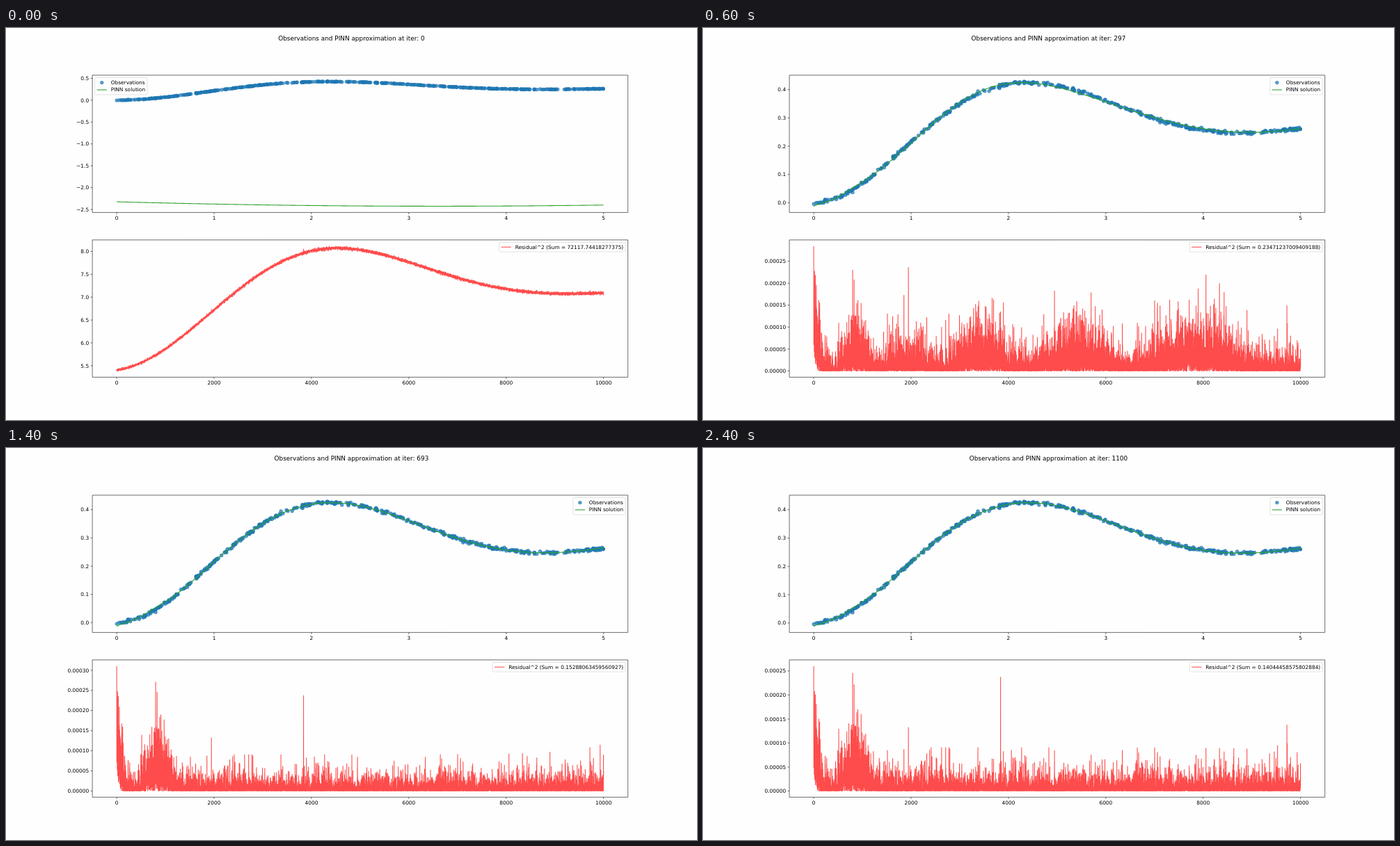
An HTML page with a canvas for the animation above (2600 ms loop, 993 by 564 pixels).

```html
<!DOCTYPE html>
<html lang="en">
<head>
<meta charset="utf-8">
<title>PINN training</title>
<style>
html, body { margin: 0; width: 100%; height: 100%; overflow: hidden; background: #fefefe; }
canvas { display: block; }
</style>
</head>
<body>
<canvas id="plot" width="993" height="564"></canvas>
<script>
const ctx = document.getElementById('plot').getContext('2d');
const PT = 0.718, EM = 10 * PT, FONT = '"DejaVu Sans", sans-serif';
const LEFT = 124.1, RIGHT = 893.7, X0 = 159.1, XSPAN = 699.6, HEIGHT = 197.5;
const TOP = 67.9, BOTTOM = 304.9;
const RED = 'rgba(255,0,0,.7)', GREEN = '#2ca02c', BLUE = 'rgba(31,119,180,.7)';
const N = 10000;
const { PI, exp, sin, cos, sqrt, min, max, floor, abs } = Math;

// Seeded noise, damped near the first sample, with a few strong outliers
let seed = 20231;
const rand = () => {
  seed = (seed + 0x6D2B79F5) | 0;
  let t = Math.imul(seed ^ seed >>> 15, 1 | seed);
  t = t + Math.imul(t ^ t >>> 7, 61 | t) ^ t;
  return ((t ^ t >>> 14) >>> 0) / 4294967296;
};
const gauss = () => sqrt(-2 * Math.log(1 - rand())) * cos(2 * PI * rand());
const noise = Array.from({ length: N + 1 }, (_, i) => {
  const limit = min(0.0095, 0.0044 + i * 2.5e-5);
  return max(-limit, min(limit, 0.003 * gauss()));
});
Object.assign(noise, { 0: 0.0047, 800: -0.0095, 1945: 0.0115, 3838: 0.0154, 9720: 0.0113, 9930: -0.0095 });

const observed = Array.from({ length: 500 }, () => floor(rand() * N));

// Step response of a damped oscillator
const truth = x => {
  const a = 0.3954, w = 1.428;
  return 0.2995 * (1 - exp(-a * x) * (cos(w * x) + a / w * sin(w * x)));
};

// Smooth curve through [x, y] knots
function curve(knots) {
  const last = knots.length - 1;
  const slope = i => {
    const a = knots[max(0, i - 1)], b = knots[min(last, i + 1)];
    return (b[1] - a[1]) / (b[0] - a[0]);
  };
  return x => {
    let i = 0;
    while (i < last - 1 && x > knots[i + 1][0]) i++;
    const [xa, ya] = knots[i], [xb, yb] = knots[i + 1];
    const h = xb - xa, t = (x - xa) / h, s = 1 - t;
    return s * s * (1 + 2 * t) * ya + t * t * (3 - 2 * t) * yb
      + h * t * s * (s * slope(i) - t * slope(i + 1));
  };
}

// Model error late in training: dip at 0, bump at 0.4, drift at the end, slowing wave
const late = (dip, bump, end, wave = 0) => x => {
  const phase = (max(sqrt(x), 0.465) - 0.8) / 0.335;
  return dip * exp(-x / 0.07) + bump * exp(-(((x - 0.4) / 0.19) ** 2))
    + end * exp((x - 5) / 0.4) - wave * min(1, 0.35 + 0.4 * x) * sin(PI * phase);
};

const stages = [
  { sum: '72117.74418277375', error: x => -2.427 + 0.102 * (1 - x / 3.3) ** 2 - truth(x) },
  { sum: '44.877644646853334', error: curve([[0, 0.09], [0.16, 0.0955], [0.5, 0.067], [0.92, 0], [1.4, -0.072],
    [1.97, -0.108], [2.55, -0.075], [3.165, 0], [3.55, 0.043], [4.125, 0.067], [5, 0.0205]]) },
  { sum: '3.2461802957314862', error: late(-0.018, 0.005, -0.02, 0.018) },
  { sum: '0.23471237009409188', error: late(-0.0122, 0.003, 0.003, 0.0053) },
  { sum: '0.15490528224337025', error: late(-0.0136, 0.007, 0.0034) },
  { sum: '0.15288063459560927', error: late(-0.013, 0.007, 0.0013) },
  { sum: '0.1529496862778658', error: late(-0.0129, 0.007, -0.0002) },
  { sum: '0.14044458575802884', error: late(-0.0115, 0.0062, -0.0006) }
];
// Training slows down, settles, and gains once more in the last step
const stageAt = n => n < 4 ? n : n < 12 ? min(6.15, (n + 3) / 2) : 7;

const px = i => X0 + i / N * XSPAN;
const scaleY = (top, lo, hi) => v => top + HEIGHT * (0.5 + ((lo + hi) / 2 - v) / (1.1 * (hi - lo)));

function setFont(size) {
  ctx.font = size * 1.034 + 'px ' + FONT;
}
function text(str, x, y, align = 'left', size = EM) {
  setFont(size);
  ctx.textAlign = align;
  ctx.fillStyle = '#000';
  ctx.fillText(str, x, y);
}
function line(points, color, width) {
  ctx.beginPath();
  for (const [x, y] of points) ctx.lineTo(x, y);
  ctx.strokeStyle = color;
  ctx.lineWidth = width * PT;
  ctx.lineJoin = 'round';
  ctx.stroke();
}
function dot(x, y) {
  ctx.beginPath();
  ctx.arc(x, y, 3 * PT, 0, 2 * PI);
  ctx.fillStyle = ctx.strokeStyle = BLUE;
  ctx.lineWidth = 1.5 * PT;
  ctx.fill();
  ctx.stroke();
}

function tickStep(range) {
  const raw = range / 9, mag = 10 ** floor(Math.log10(raw));
  return [1, 2, 2.5, 5, 10].find(s => s * mag >= raw) * mag;
}
function axes(top, lo, hi, xStep) {
  const base = top + HEIGHT, y = scaleY(top, lo, hi), pad = 0.05 * (hi - lo);
  ctx.strokeStyle = '#000';
  ctx.lineWidth = 0.8 * PT;
  ctx.strokeRect(LEFT, top, RIGHT - LEFT, HEIGHT);
  for (let i = 0; i <= 5; i++) {
    const x = X0 + XSPAN * i / 5;
    line([[x, base], [x, base + 2.5]], '#000', 0.8);
    text(i * xStep, x, base + 10.4, 'center');
  }
  const step = tickStep(1.1 * (hi - lo));
  let digits = 0;
  while (abs(step * 10 ** digits - Math.round(step * 10 ** digits)) > 1e-6) digits++;
  for (let k = Math.ceil((lo - pad) / step); k * step <= hi + pad; k++) {
    const ty = y(k * step);
    line([[LEFT - 2.5, ty], [LEFT, ty]], '#000', 0.8);
    text((k * step).toFixed(digits).replace('-', '\u2212'), LEFT - 5, ty + 2.65, 'right');
  }
}
function legend(top, atLeft, rows) {
  setFont(EM);
  const w = max(...rows.map(r => ctx.measureText(r.label).width)) + 3.6 * EM;
  const x = atLeft ? LEFT + EM / 2 : RIGHT - EM / 2 - w, y = top + EM / 2;
  ctx.beginPath();
  ctx.roundRect(x, y, w, rows.length * 10.9 + 2.6, 0.2 * EM);
  ctx.fillStyle = 'rgba(255,255,255,.8)';
  ctx.fill();
  ctx.strokeStyle = 'rgba(204,204,204,.8)';
  ctx.lineWidth = PT;
  ctx.stroke();
  rows.forEach(({ label, color }, i) => {
    const cy = y + 6.7 + i * 10.8, hx = x + 0.4 * EM;
    if (color) line([[hx, cy], [hx + 2 * EM, cy]], color, 1.5);
    else dot(hx + EM, cy + 0.4);
    text(label, hx + 2.8 * EM, cy + 2.4);
  });
}

function draw(n) {
  const stage = stageAt(n), m = stage % 1;
  const a = stages[floor(stage)], b = stages[Math.ceil(stage)];
  const error = x => a.error(x) * (1 - m) + b.error(x) * m;

  ctx.fillStyle = '#fefefe';
  ctx.fillRect(0, 0, 993, 564);
  text('Observations and PINN approximation at iter: ' + min(99 * n + floor(n / 12) * 99, n < 12 ? 1089 : 1100),
    496.4, 17.7, 'center', 12 * PT);

  const fit = Array.from({ length: 201 }, (_, k) => truth(k / 40) + error(k / 40));
  const lo = min(-0.0034, ...fit), hi = 0.4292, y = scaleY(TOP, lo, hi);
  for (const i of observed) dot(px(i), y(truth(i * 5 / N) + noise[i]));
  line(fit.map((v, k) => [px(k * 50), y(v)]), GREEN, 1.5);
  axes(TOP, lo, hi, 1);
  legend(TOP, n === 0, [{ label: 'Observations' }, { label: 'PINN solution', color: GREEN }]);

  const residual = noise.map((e, i) => (e - error(i * 5 / N)) ** 2);
  const rLo = min(...residual), rHi = max(...residual), ry = scaleY(BOTTOM, rLo, rHi);
  line(residual.map((v, i) => [px(i), ry(v)]), RED, 1.5);
  axes(BOTTOM, rLo, rHi, 2000);
  const sum = m ? a.sum * (1 - m) + b.sum * m : a.sum;
  legend(BOTTOM, n === 2, [{ label: `Residual^2 (Sum = ${sum})`, color: RED }]);
}

let shown = -1;
function tick() {
  const n = floor(performance.now() % 2600 / 200);
  if (n !== shown) draw(shown = n);
  requestAnimationFrame(tick);
}
tick();
</script>
</body>
</html>
```
